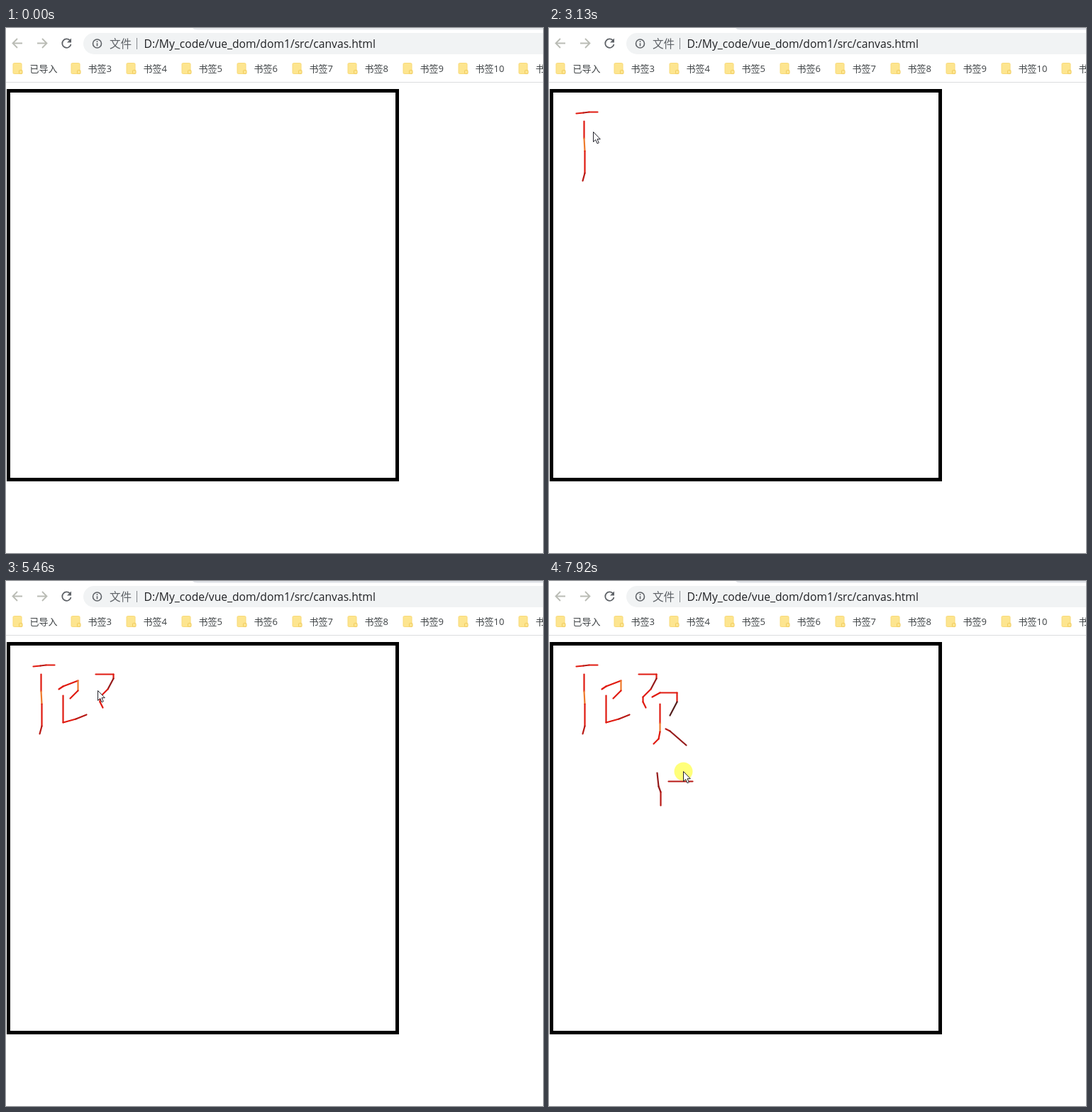
Write an HTML page with a canvas that moves like this. It is 757 px wide and 740 px high and loops after 7.99 s.

```html
<!DOCTYPE html>
<html lang="zh-CN">
<head>
<meta charset="utf-8">
<title>canvas</title>
<style>
  html, body { margin: 0; width: 100%; height: 100%; overflow: hidden; background: #fff; }
  svg, canvas { position: absolute; left: 0; top: 0; display: block; }
  text { font-family: 'Open Sans', 'Noto Sans CJK SC', 'Noto Sans CJK', sans-serif; }
  .bookmark { font-size: 13px; fill: #3c4043; }
</style>
</head>
<body>
<svg width="757" height="740" viewBox="0 0 757 740">
  <defs>
    <g id="folder">
      <rect x=".5" y=".5" width="12" height="15" rx="1.5" fill="#fde58f" stroke="#f8da78"/>
      <rect x="9" y="10.5" width="4.5" height="5" rx="1" fill="#fde58f" stroke="#f0cb5c"/>
    </g>
  </defs>
  <g fill="none" stroke="#babcb5" stroke-width="1.8">
    <path d="M23 21.5H10M16 15L9.5 21.5L16 28"/>
    <path d="M44 21.5H57M51 15L57.5 21.5L51 28"/>
    <path d="M90.5 18A6.2 6.2 0 1 0 91.5 23" stroke="#5f6368"/>
  </g>
  <path d="M92 14.5V20.5H86Z" fill="#5f6368"/>
  <rect x="109" y="7" width="700" height="30" rx="15" fill="#f1f3f4"/>
  <circle cx="128.5" cy="22" r="6" fill="none" stroke="#5f6368" stroke-width="1.6"/>
  <path d="M128.5 18.3V20M128.5 21.2V25.5" stroke="#5f6368" stroke-width="1.6"/>
  <text x="146" y="27.5" font-size="15.6" fill="#5f6368">文件</text>
  <path d="M184.5 14V30" stroke="#85898d"/>
  <text x="194.5" y="27.5" font-size="15.65" fill="#202124">D:/My_code/vue_dom/dom1/src/canvas.html</text>
  <g id="bookmarks"></g>
  <path d="M0 76.5H757" stroke="#dcdddf"/>
  <rect x="3.5" y="88.5" width="548" height="548" fill="none" stroke="#000" stroke-width="5"/>
</svg>
<canvas width="757" height="740"></canvas>
<script>
const LOOP = 7990, STEPS = 120, FOCUS_STEP = 20;
const INK_OFFSET = { x: 13.5, y: 14.5 };
const RED = '#e01a10', CRIMSON = '#b81a16', MAROON = '#961c1c', DARK = '#54201e', ORANGE = '#ee7a2c';

// Pointer without the button held: [step, x, y]
const hover = [
  [2, 616, 675], [5, 380, 460], [8, 120, 290], [10, 56, 222], [11, 51, 203],
  [13, 52, 112], [15, 48, 109], [45, 58, 160], [47, 62, 146], [65, 104, 143],
  [82, 129, 154], [95, 133, 214], [101, 175, 235], [106, 146, 260], [108, 146, 260]
];

// Pointer while drawing: [step, x, y, colour of the segment ending here]
const strokes = [
  [[20, 25, 106], [24, 25, 106], [25, 35, 105, RED], [26, 43, 104, CRIMSON], [27, 55, 104, RED]],
  [[30, 36, 117], [32, 36, 141, RED], [33, 37, 159, ORANGE], [38, 37, 190, RED], [40, 34, 201, CRIMSON]],
  [[49, 61, 138], [50, 67, 134, RED], [52, 88, 126, RED], [53, 88, 140, ORANGE], [55, 77, 151, RED]],
  [[57, 67, 147], [61, 67, 185, RED], [62, 85, 180, RED], [63, 100, 174, CRIMSON]],
  [[68, 113, 117], [71, 138, 117, RED], [72, 138, 117], [73, 138, 123, RED], [74, 130, 138, MAROON],
   [76, 119, 149, RED], [77, 119, 156, RED], [78, 123, 164, RED]],
  [[83, 132, 149], [84, 143, 143, RED], [85, 167, 143, RED], [87, 167, 156, RED], [88, 157, 175, DARK]],
  [[90, 143, 159], [91, 143, 186, RED], [92, 143, 198, ORANGE], [93, 141, 208, RED], [94, 134, 215, RED]],
  [[96, 151, 194], [97, 157, 197, CRIMSON], [98, 180, 217, MAROON]],
  [[109, 139, 256], [111, 141, 275, MAROON], [112, 144, 283, MAROON], [113, 144, 302, CRIMSON]],
  [[116, 155, 268], [119, 189, 268, CRIMSON]]
];
const route = [...hover, ...strokes.flat()].sort((a, b) => a[0] - b[0]);

const labels = ['已导入', ...Array.from({ length: 9 }, (_, i) => '书签' + (i + 3))];
document.getElementById('bookmarks').innerHTML = labels.map((label, i) => {
  const x = i === 0 ? 10 : 14 + 78 * i + (i === 9 ? 7 : 0);
  return `<use href="#folder" x="${x - .5}" y="49"/><text class="bookmark" x="${x + 23.5}" y="62">${label}</text>`;
}).join('');

const ctx = document.querySelector('canvas').getContext('2d');
const arrow = new Path2D('M.5 .5V14.5L3.7 11.5L6 16.8L8.3 15.8L6 10.7H10.3Z');

function between(a, b, step) {
  const k = Math.max(0, Math.min(1, (step - a[0]) / (b[0] - a[0])));
  return [a[1] + (b[1] - a[1]) * k, a[2] + (b[2] - a[2]) * k];
}

function pointerAt(step) {
  const next = route.findIndex(p => p[0] >= step);
  return next > 0 ? between(route[next - 1], route[next], step) : route[0].slice(1, 3);
}

function drawTabStrip(step) {
  ctx.fillStyle = step >= FOCUS_STEP ? '#dee1e6' : '#e7eaed';
  ctx.beginPath();
  ctx.moveTo(263, 0);
  ctx.quadraticCurveTo(265, 2.5, 270, 2.5);
  ctx.lineTo(757, 2.5);
  ctx.lineTo(757, 0);
  ctx.fill();
}

function drawInk(step) {
  ctx.save();
  ctx.translate(INK_OFFSET.x, INK_OFFSET.y);
  ctx.lineWidth = 2.2;
  ctx.lineCap = 'round';
  for (const stroke of strokes) {
    for (let i = 1; i < stroke.length && stroke[i - 1][0] < step; i++) {
      const [a, b] = [stroke[i - 1], stroke[i]];
      if (!b[3]) continue;
      ctx.strokeStyle = b[3];
      ctx.beginPath();
      ctx.moveTo(a[1], a[2]);
      ctx.lineTo(...between(a, b, step));
      ctx.stroke();
    }
  }
  ctx.restore();
}

function drawPointer(step) {
  const [x, y] = pointerAt(step).map(Math.round);
  const pressed = strokes.some(s => step >= s[0][0] && step <= s[s.length - 1][0]);
  ctx.save();
  ctx.translate(x, y);
  if (pressed) {
    ctx.fillStyle = 'rgba(255, 255, 0, .52)';
    ctx.beginPath();
    ctx.arc(.5, .5, 13, 0, 2 * Math.PI);
    ctx.fill();
  }
  ctx.fillStyle = '#fff';
  ctx.strokeStyle = '#24242c';
  ctx.lineWidth = 1;
  ctx.fill(arrow);
  ctx.stroke(arrow);
  ctx.restore();
}

const start = performance.now();
function render() {
  const time = (performance.now() - start) % LOOP;
  const step = Math.min(STEPS - 1, Math.floor((time + 9) / LOOP * STEPS));
  ctx.clearRect(0, 0, 757, 740);
  drawTabStrip(step);
  drawInk(step);
  if (step >= route[0][0]) drawPointer(step);
  requestAnimationFrame(render);
}
render();
</script>
</body>
</html>
```
